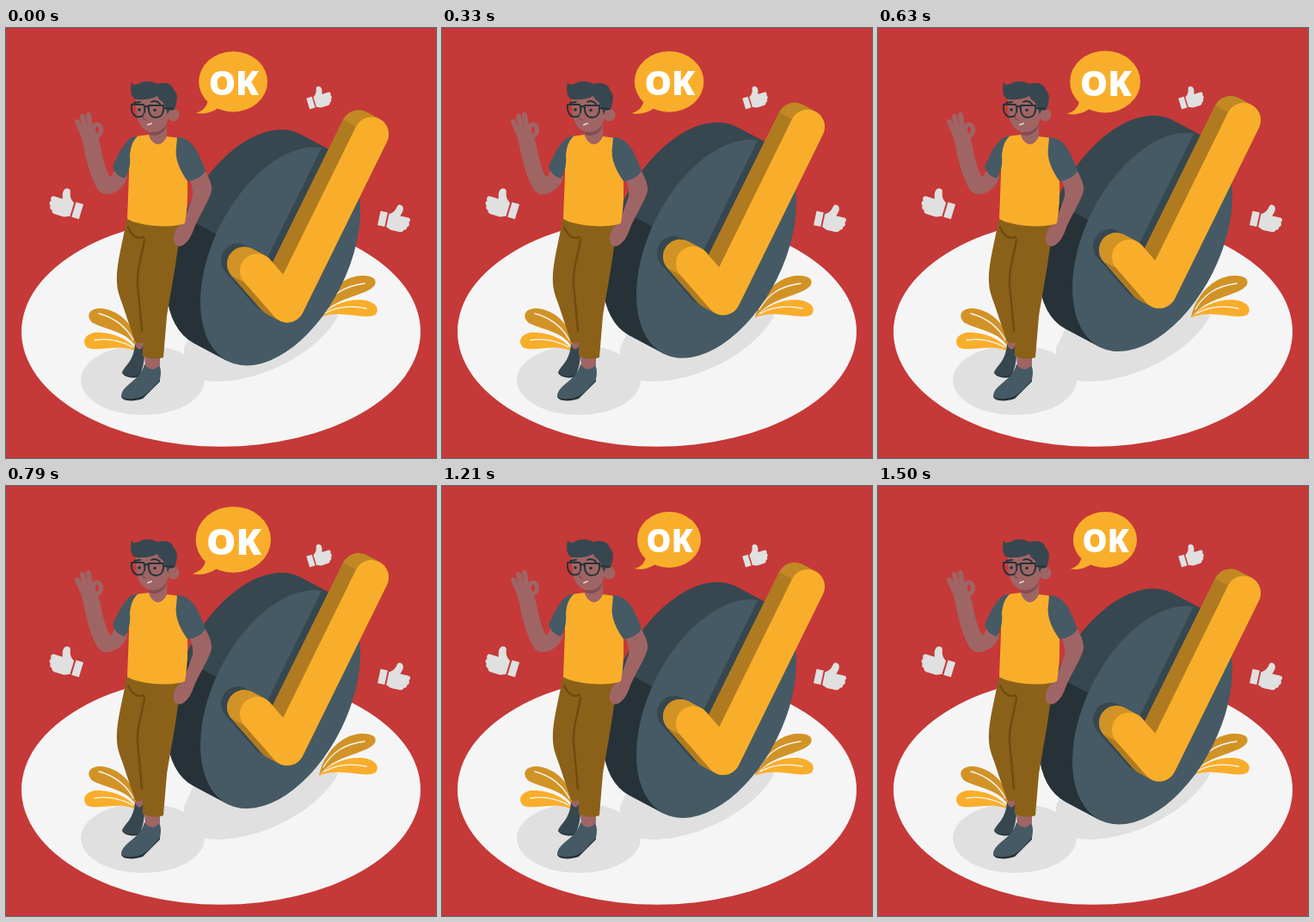
Write an HTML page that moves like this. It is 500 px wide and 500 px high and loops after 1.54 s.

```html
<!DOCTYPE html>
<html lang="en">
<head>
<meta charset="utf-8">
<title>OK</title>
<style>
  html, body { margin: 0; height: 100%; overflow: hidden; background: #c53938; }
  svg { display: block; width: 100%; height: 100%; }
  .skin { fill: #9f6565; }
  .slate { fill: #455a64; }
  .dark { fill: #37474f; }
  .ink { fill: #263238; }
  .gold { fill: #f9ae2b; }
  .ochre { fill: #d29326; }
  .side { fill: #b07b20; }
  .shade { fill: #e0e0e0; }
  .line { fill: none; stroke-linecap: round; stroke-linejoin: round; }
  .tick { stroke-width: 40; }
  .vein { stroke: #f5f5f5; stroke-width: 1.3; }
  text { font: 800 36.5px "Open Sans", sans-serif; fill: #fff; text-anchor: middle; }
</style>
</head>
<body>
<svg viewBox="0 0 500 500">
  <defs>
    <path id="tick" class="line tick" d="M292 265 327 305 425 106"/>
    <ellipse id="face" cx="319" cy="248" rx="78.6" ry="136.4" transform="rotate(26.5 319 248)"/>
    <clipPath id="faceClip"><use href="#face"/></clipPath>
    <path id="thumb" class="shade" d="M0 10H9V28H0ZM11 11.5C16 9 18 5 19 0C20-4 27-3 27 3C27 6 26 8 25 11H35C39 11 39 15.5 37 16.5C39 18 38.5 22 36 22.5C37 25 35 27 33 27C33 29 31 30.5 29 30.5H18C15 30 13 28 11 28Z"/>
  </defs>

  <ellipse cx="250" cy="353" rx="232" ry="133.7" fill="#f5f5f5"/>
  <ellipse class="shade" cx="159" cy="409.5" rx="72" ry="40.5"/>
  <path class="shade" d="M207 372C207 400 220 411 245 411C300 411 365 375 386 335L360 300L220 345Z"/>

  <g id="thumbs">
    <use href="#thumb" transform="translate(93 195.5) rotate(17) scale(-1 1)"/>
    <use href="#thumb" transform="translate(437.5 203.5) rotate(12) scale(.94)"/>
    <use href="#thumb" transform="translate(347 74.5) rotate(-17) scale(.75)"/>
  </g>

  <g id="leaves">
    <path class="ochre" d="M364 337C369 312 388 290 412 288C427 287 433 293 428 300C418 312 382 312 364 337Z"/>
    <path class="gold" d="M364 337C377 322 396 315 414 316C430 318 435 326 430 333C418 341 386 326 364 337Z"/>
    <path class="line vein" d="M369 327C379 310 393 300 417 297M370 332C384 324 400 322 419 326"/>
    <path class="ochre" d="M153 374C152 348 134 328 110 326C95 326 93 336 101 343C118 352 142 352 153 374Z"/>
    <path class="gold" d="M154 378C146 363 125 353 103 354C90 357 88 366 95 372C110 377 136 365 154 378Z"/>
    <path class="line vein" d="M108 332C127 337 141 349 148 363M103 363C122 360 136 365 147 371"/>
  </g>

  <g id="disc">
    <path class="dark" d="M341.4 105.5A78.6 136.4 26.5 0 0 217.6 348.5L257.1 369.5A78.6 136.4 26.5 0 0 380.9 126.5Z"/>
    <path class="ink" d="M204.8 201A78.6 136.4 26.5 0 0 217.6 348.5L257.1 369.5L300 300L244.3 222Z"/>
    <use href="#face" class="slate"/>
    <g clip-path="url(#faceClip)"><use href="#tick" x="-22" y="-12" stroke="#37474f"/></g>
    <g id="extrusion" stroke="#b07b20"></g>
    <path class="line tick" stroke="#d29326" d="M277 257 292 265"/>
    <path class="line tick" stroke="#c28823" d="M410 98 425 106"/>
    <path class="side" d="M392 89L407 97L322 269L307 261ZM262 270.2L277 278.2L312 318.2L297 310.2Z"/>
    <use href="#tick" stroke="#f9ae2b"/>
  </g>

  <g id="man">
    <path class="skin" d="M151 358L159 360V378H151ZM161 380H179V392L174 400L162 396Z"/>
    <path class="ink" d="M135 401C138 407 150 408 156 405L158 400ZM134 428C134 434 148 435 159 431L179 411V406Z"/>
    <path class="dark" d="M150 367C153 376 157 375 160 368C162 380 161 391 156 403C148 406 138 405 135 401C137 393 149 388 150 367Z"/>
    <path class="slate" d="M161 391C167 399 174 398 178 392C181 397 180 404 179 409C172 416 166 425 157 429C148 432 136 432 134 428C135 414 156 411 161 391Z"/>

    <path fill="#8b6119" d="M140 222C138 240 131 262 129 285C128 303 131 309 136 323L150 365C153 367 156 367 159 365L159 381C165 385 176 386 183 383L187 335C191 310 196 285 200 255L207 226Z"/>
    <path class="line" stroke="#6f4c10" stroke-width="2.5" d="M161 246C158 268 152 276 153 298L158 352M142 232C147 243 153 246 160 243"/>

    <g id="arms" class="skin">
      <path d="M89 130C91 146 97 170 105 185C110 195 119 195 128 190C135 186 140 180 141 172L127 163C124 171 122 177 119 170C114 158 111 146 109 131Z"/>
      <ellipse cx="98" cy="129" rx="10" ry="9"/>
      <path class="line" stroke="#9f6565" stroke-width="6" d="M91 127 83 109M94 124 89 103M99 121 96 101"/>
      <ellipse cx="106" cy="118.5" rx="4.6" ry="6.5" fill="none" stroke="#9f6565" stroke-width="5"/>
      <path d="M213 174L231 165C238 177 241 186 238 193C232 208 224 220 219 232C216 241 212 249 205 253C198 256 194 250 195 243C196 235 200 230 206 227C210 215 214 205 217 196C218 188 216 184 213 174Z"/>
    </g>

    <path class="gold" d="M150 126C144 137 143 150 143 170L141 222C156 231 195 233 208 227C212 205 211 190 211 172L202 128L187 126C180 136 171 135 166 124Z"/>
    <path class="slate" d="M154 125C140 127 134 140 124 161C126 168 131 173 138 175C143 167 145 160 144 147C145 137 148 130 154 125Z"/>
    <path class="slate" d="M199 127C215 128 222 139 232 166C228 174 217 178 211 178C202 165 196 152 198 139Z"/>

    <path class="skin" d="M167 112L187 106L187 126C184 133 179 136 175 135C170 133 167 129 166 124Z"/>
    <path fill="#834e50" d="M167 120C176 122 183 118 187 111C186 121 177 128 166 124Z"/>
    <path class="skin" d="M151 78C151 94 151 105 157 114C163 122 171 122 178 120C185 116 188 110 190 100L191 76Z"/>
    <ellipse class="skin" cx="194.5" cy="101" rx="7" ry="7.5"/>
    <path class="dark" d="M151 83C145 81 144 72 146 63C148 67 151 66 154 65C161 60 170 62 176 65C187 62 194 66 195 72C201 77 199 86 196 95L190 96L188 101C186 93 184 89 182 86C179 84 177 82 176 79C169 83 159 84 151 83Z"/>
    <g class="line" stroke="#263238">
      <path stroke-width="1.8" d="M149 87 156 86M169 86C173 84 177 86 179 88"/>
      <path stroke-width="1.9" d="M146 89H160C163 94 161 102 157 103C149 105 145 98 146 89ZM166 90H183C184 97 182 104 174 104C168 104 165 98 166 90Z"/>
      <path stroke-width="2" d="M161 92C163 90 165 91 166 93M183 93 194 94"/>
    </g>
    <path class="line" stroke="#834e50" stroke-width="1.3" d="M161 99C159 104 158 106 163 107"/>
    <path class="line" stroke="#e8d4d4" stroke-width="1.8" d="M165 112.5 169 111"/>
    <circle class="ink" cx="155" cy="95" r="1.8"/>
    <circle class="ink" cx="173" cy="95.5" r="1.8"/>
  </g>

  <g id="bubble">
    <ellipse class="gold" cx="264" cy="62.5" rx="37" ry="32.5"/>
    <path class="gold" d="M237 82C236 89 232 94 224 96C233 98.5 243 95 249 90Z"/>
    <text x="264.7" y="77.2">OK</text>
  </g>
</svg>
<script>
  const byId = id => document.getElementById(id);
  const PERIOD = 1540, LEAD = 40;

  // Stacked copies of the tick form its thickness.
  byId('extrusion').innerHTML = Array.from({ length: 16 }, (_, i) =>
    `<use href="#tick" x="${i - 15}" y="${(i - 15) * 8 / 15}"/>`).join('');

  // [phase, scale] pairs, joined linearly: two beats, then rest.
  const beats = [[0, 1], [.1, 1.3], [.3, 1], [.4, 1], [.5, 1.3], [.6, 1], [1, 1]];

  function beatScale(phase) {
    const i = beats.findIndex(([p]) => p > phase);
    const [p0, s0] = beats[i - 1], [p1, s1] = beats[i];
    return s0 + (s1 - s0) * (phase - p0) / (p1 - p0);
  }

  const start = performance.now();

  function draw() {
    const phase = (performance.now() - start + LEAD) % PERIOD / PERIOD;
    const drop = 20 * Math.abs(1 - 2 * phase) - 1.5;
    byId('disc').setAttribute('transform', `translate(0 ${drop})`);
    byId('bubble').setAttribute('transform',
      `translate(262.5 63.5) scale(${beatScale(phase)}) translate(-262.5 -63.5)`);
    requestAnimationFrame(draw);
  }
  draw();
</script>
</body>
</html>
```
